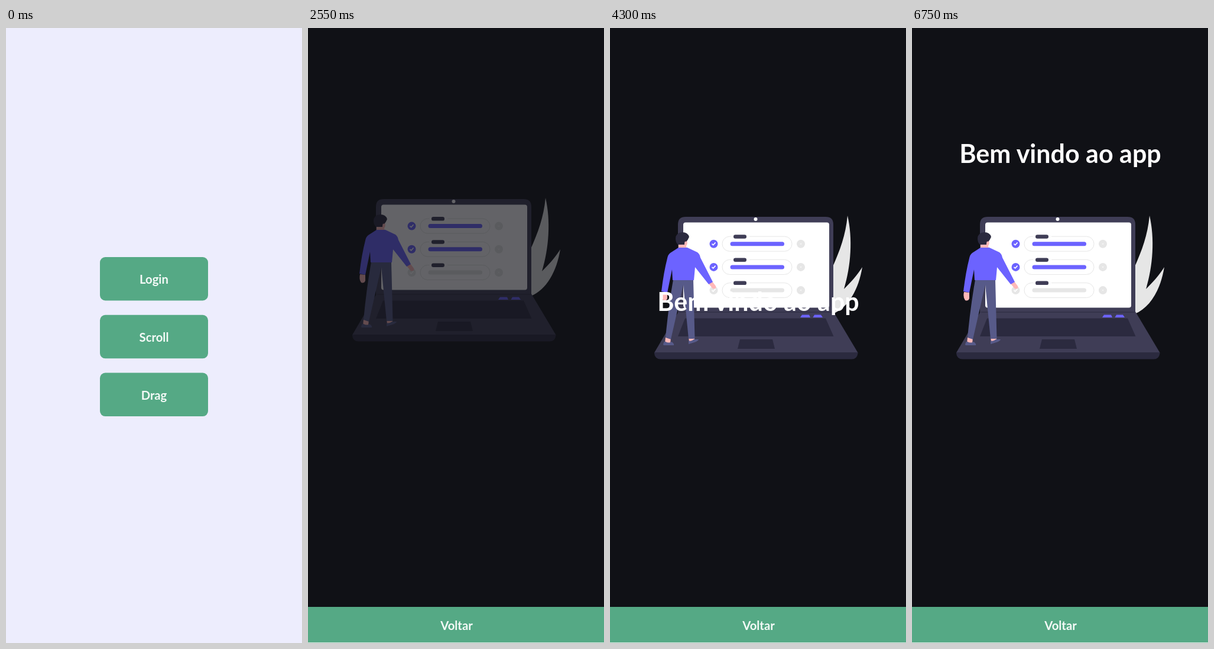
An HTML page that plays this animation: 501x1039 px, repeating every 6800 ms.

```html
<!DOCTYPE html>
<html lang="pt">
<head>
<meta charset="utf-8">
<title>App</title>
<style>
  html, body { margin: 0; width: 100%; height: 100%; overflow: hidden; background: #ededfd; }
  svg { display: block; width: 100%; height: 100%; }
  text { font: 700 20.3px Lato, "Noto Sans", sans-serif; fill: #f4faf7; text-anchor: middle; }
  #title { font-size: 43px; fill: #fff; }
  .green { fill: #55a985; }
  .slate { fill: #3f3d56; }
  .ink { fill: #2b2a3f; }
  .purple { fill: #6c63ff; }
  .gray { fill: #e6e6e6; }
  .skin { fill: #ffb8b8; }
  .trousers { fill: #575a89; }
</style>
</head>
<body>
<svg viewBox="0 0 501 1039">
  <rect width="501" height="1039" fill="#ededfd"/>
  <g id="menu"></g>
  <g id="touch">
    <circle cx="311" cy="428.5" r="16" fill="#fff" opacity=".1"/>
    <circle cx="311" cy="428.5" r="12.5" fill="#98c8b4" stroke="#b4d3c8"/>
  </g>

  <g id="welcome">
    <rect width="501" height="1039" fill="#101116"/>
    <g id="art">
      <path class="gray" d="M402 317C411 355 408 402 396 441C408 429 419 417 427 404C421 441 404 472 377 483V403C389 376 399 350 402 317Z"/>
      <path class="slate" d="M115 480V332Q115 319 128 319H365Q378 319 378 332V480Z"/>
      <rect x="124" y="328.5" width="247" height="144" rx="4" fill="#fff"/>
      <circle cx="246.5" cy="323" r="3" fill="#fff"/>
      <path class="slate" d="M116 479H378L419.500 548.500H75Z"/>
      <path d="M117 480H377" stroke="#2b2a3f"/>
      <path class="ink" d="M75 548H419.500V550Q418 559.500 409 559.500H86Q76 559.500 75 550Z"/>
      <path class="ink" d="M127 490.500H365L378.500 521H115ZM220 526H275L279 542H216Z"/>
      <path class="purple" d="M325 484.500H337L339 489H322ZM346 484.500H357L360 489H343.500Z"/>
      <g id="rows"></g>

      <path class="skin" d="M88 446L97 447L97 457Q95 462 90 460Q86 455 88 446ZM167 432L173 428L179 436Q181 441 174 440.500Z"/>
      <path class="skin" d="M94 522L103 523L102 533H93ZM133 522H143V530H134Z"/>
      <path class="trousers" d="M107 425H141L143.500 525H133L124 434L103 526L94 523Q99 470 107 425Z"/>
      <path class="trousers" d="M90 535Q91 529 94 530Q100 533 104 530Q109 533 108 536H91ZM133 534V528Q137 530 142 526L150 526Q149 529 143 531Z"/>
      <path class="skin" d="M116 358H130Q132 365 129 368L130 373H116Z"/>
      <path class="ink" d="M111 356Q111 346 122 345Q132 345 134 353Q132 358 129 361Q126 359 126 366H115Q111 362 111 356Z"/>
      <path class="purple" d="M116 371H131L148 379Q152 382 153 388L174 429L167 433L144 404L142 426H106L105 408L97 447L87 445Q91 412 97 389Q98 383 102 380Z"/>
    </g>
    <text id="title" x="251" y="662">Bem vindo ao app</text>
    <rect class="green" y="978" width="501" height="60"/>
    <rect y="1038" width="501" height="1" fill="#dcebe5"/>
    <text x="251.500" y="1016.500">Voltar</text>
  </g>
</svg>

<script>
const LOOP = 6800;
const $ = id => document.getElementById(id);

$('menu').innerHTML = ['Login', 'Scroll', 'Drag'].map((label, i) => `
  <g transform="translate(0 ${i * 97.8})">
    <rect class="green" x="159" y="387" width="183" height="73.500" rx="9"/>
    <text x="250.500" y="432">${label}</text>
  </g>`).join('');

$('rows').innerHTML = [0, 1, 2].map(i => {
  const tone = i < 2 ? 'purple' : 'gray';
  return `
  <g transform="translate(0 ${364.7 + i * 39.2})">
    <rect x="190" y="-12.500" width="118" height="25" rx="12.500" fill="none" stroke="#e6e6e6"/>
    <rect x="205" y="-15" width="31" height="6" fill="#fff"/>
    <rect class="slate" x="209" y="-15.500" width="22" height="6.500" rx="3.200"/>
    <rect class="${tone}" x="203.500" y="-3.500" width="91.500" height="7" rx="3.500"/>
    <circle class="${tone}" cx="175.500" r="7"/>
    <path d="M172.500 0L174.700 2L178.500 -2.300" fill="none" stroke="#fff" stroke-width="1.600"/>
    <circle class="gray" cx="323" r="7"/>
    <path d="M321.500 -1.500L324.500 1.500M324.500 -1.500L321.500 1.500" stroke="#f6f6f6"/>
  </g>`;
}).join('');

// Progress from 0 to 1, optionally eased in and out quadratically
const linear = (t, start, length) => Math.min(1, Math.max(0, (t - start) / length));
const ease = (t, start, length) => {
  const p = linear(t, start, length);
  return p < .5 ? 2 * p * p : 1 - 2 * (1 - p) ** 2;
};

const login = $('menu').firstElementChild;

function draw() {
  const t = performance.now() % LOOP;
  login.setAttribute('opacity', 1 - .3 * ease(t, 1780, 150));
  $('touch').setAttribute('opacity', t < 1800 ? 0 : 1);
  $('welcome').setAttribute('opacity', linear(t, 2040, 100));

  const drop = ease(t, 2135, 1000);
  $('art').setAttribute('opacity', t < 2400 ? 0 : drop);
  $('art').setAttribute('transform', `translate(0 ${-46 * (1 - drop)})`);

  $('title').setAttribute('opacity', ease(t, 3150, 500));
  $('title').setAttribute('transform', `translate(0 ${-434 * ease(t, 4163, 300)})`);
  requestAnimationFrame(draw);
}
draw();
</script>
</body>
</html>
```
